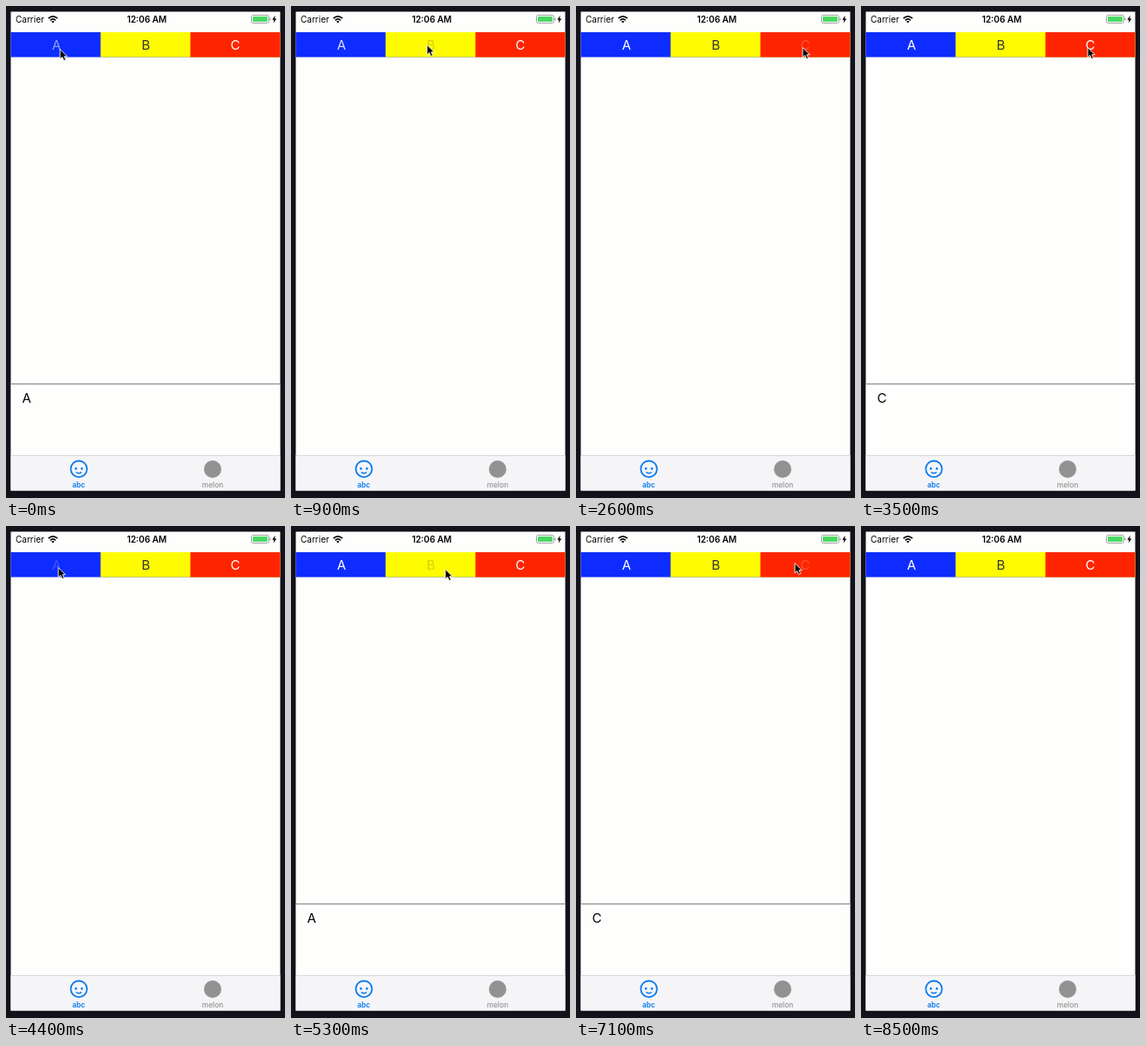
Recreate the animation shown at these times as an HTML page. Size 320 by 563 pixels, loop 9.1 s.

```html
<!DOCTYPE html>
<html lang="en">
<head>
<meta charset="utf-8">
<title>Bottom sheet</title>
<style>
  html, body { margin: 0; width: 100%; height: 100%; overflow: hidden; background: #12121a; }
  svg { display: block; }
  text { font-family: Inter, Roboto, "Liberation Sans", sans-serif; }
  .mid { text-anchor: middle; }
  .title { font-size: 15px; }
  .status { font-size: 10px; }
  .tab { font-size: 8.3px; font-weight: 600; }
</style>
</head>
<body>
<svg width="320" height="563" viewBox="0 0 320 563">
  <rect width="320" height="563" fill="#12121a"/>
  <rect x="5.5" y="6.5" width="309" height="548" fill="#fefefd"/>

  <!-- status bar -->
  <text class="status" x="11" y="19">Carrier</text>
  <g fill="none" stroke="#000" stroke-width="1.7">
    <path d="M48.6 14.2Q53.8 9.6 59 14.2"/>
    <path d="M50.7 16.3Q53.8 13.5 56.9 16.3"/>
  </g>
  <path d="M52 17.7Q53.8 16.2 55.6 17.7L53.8 19.6Z"/>
  <text class="status mid" x="161.5" y="19" font-weight="600">12:06 AM</text>
  <rect x="281.5" y="10.5" width="20" height="9" rx="2" fill="none" stroke="#96969a" stroke-width=".9"/>
  <rect x="283" y="12" width="17" height="6" rx="1" fill="#4cd964"/>
  <rect x="302.5" y="13.5" width="1.2" height="3" rx=".6" fill="#96969a"/>
  <path d="M308.8 10.8L305.4 15.8H307.4L306.8 19.6L310.3 14.4H308.2Z"/>

  <!-- buttons -->
  <rect x="5.5" y="30" width="309" height="28.5" fill="#0e2cff"/>
  <rect x="108.5" y="30" width="206" height="28.5" fill="#fffb00"/>
  <rect x="211.5" y="30" width="103" height="28.5" fill="#ff2400"/>
  <g class="title mid" id="titles">
    <text x="58" y="49.6" fill="#fff">A</text>
    <text x="160.5" y="49.6" fill="#333336">B</text>
    <text x="263" y="49.6" fill="#fff">C</text>
  </g>

  <!-- sheet, clipped by the tab bar -->
  <svg x="5.5" y="59" width="309" height="455" overflow="hidden">
    <g id="sheet">
      <rect y="373" width="309" height="82" fill="#fefefd"/>
      <rect y="373" width="309" height="1" fill="#808086"/>
      <text id="letter" class="title" x="13" y="395">A</text>
    </g>
  </svg>

  <!-- tab bar -->
  <rect x="5.5" y="514" width="309" height="40.5" fill="#f5f5f8"/>
  <rect x="5.5" y="514" width="309" height=".7" fill="#c8c8d2"/>
  <g fill="none" stroke="#0a7aef" stroke-width="1.8" stroke-linecap="round">
    <circle cx="83.6" cy="529.8" r="9.3"/>
    <path d="M81 533.6Q83.6 535.8 86.2 533.6" stroke-width="1.4"/>
  </g>
  <g fill="#0a7aef">
    <circle cx="80.2" cy="529.4" r="1.3"/>
    <circle cx="87" cy="529.4" r="1.3"/>
    <text class="tab mid" x="83.5" y="551">abc</text>
  </g>
  <g fill="#929292">
    <circle cx="237" cy="530" r="10"/>
    <text class="tab mid" x="237" y="551" style="font-weight:500">melon</text>
  </g>

  <path id="cursor" d="M0 0V11.2L2.6 8.9L4.5 13L6.6 12.1L4.8 8.2H8.2Z"
        stroke="#fff" stroke-width=".9" stroke-linejoin="round"/>
</svg>
<script>
const LOOP = 9100, STEP = 100;
const SLIDE = 300, TRAVEL = 400, PRESS = 150, FADE = 470;
const SHEET_HEIGHT = 82, BUTTON_WIDTH = 103, DIM = 0.2;

// Each tap is a time and a pointer position; the position picks the button.
const tap = (time, x, y) => ({ time, x, y, button: Math.floor((x - 5.5) / BUTTON_WIDTH) });
const taps = [
  tap(-310, 62, 50), tap(480, 62, 50),
  tap(1050, 156, 45), tap(1620, 156, 45),
  tap(2720, 260, 48), tap(3800, 260, 48),
  tap(4500, 60, 48), tap(5450, 177, 50),
  tap(6470, 249, 44), tap(7230, 251, 43)
];
const exit = { time: 8500, x: 300, y: 5 };
const stops = [...taps, exit];

// A tap closes whatever is open, then opens its own sheet unless that was it.
const slides = [];
let shown = -1;
for (const { time, button } of taps) {
  const busy = shown >= 0;
  if (busy) slides.push({ time, button: shown, opens: false });
  if (shown === button) { shown = -1; continue; }
  slides.push({ time: time + (busy ? SLIDE : 0), button, opens: true });
  shown = button;
}

const byId = id => document.getElementById(id);
const sheet = byId('sheet'), letter = byId('letter'), cursor = byId('cursor');
const titles = [...byId('titles').children];

const clamp = v => Math.min(1, Math.max(0, v));
const ease = v => { v = clamp(v); return v * v * (3 - 2 * v); };
const shift = (el, x, y) => el.setAttribute('transform', `translate(${x} ${y})`);

function drawSheet(t) {
  const { time, button, opens } = slides.filter(s => s.time <= t).pop();
  const p = ease((t - time) / SLIDE);
  letter.textContent = 'ABC'[button];
  shift(sheet, 0, SHEET_HEIGHT * (opens ? 1 - p : p));
}

function drawTitles(t) {
  titles.forEach((el, i) => {
    const last = taps.filter(e => e.button === i && e.time - PRESS <= t).pop();
    const p = last ? clamp((t - last.time) / FADE) : 1;
    el.setAttribute('opacity', DIM + (1 - DIM) * p * p);
  });
}

function drawCursor(t) {
  let { x, y } = stops[0];
  for (const s of stops) {
    const p = ease((t - (s.time - PRESS - TRAVEL)) / TRAVEL);
    x += (s.x - x) * p;
    y += (s.y - y) * p;
  }
  shift(cursor, x, y - 0.5);
  cursor.setAttribute('visibility', t < exit.time ? 'visible' : 'hidden');
}

const origin = performance.now();
function draw() {
  const now = Math.max(0, performance.now() - origin) % LOOP;
  const t = Math.floor(now / STEP) * STEP;
  drawSheet(t);
  drawTitles(t);
  drawCursor(t);
  requestAnimationFrame(draw);
}
draw();
</script>
</body>
</html>
```
